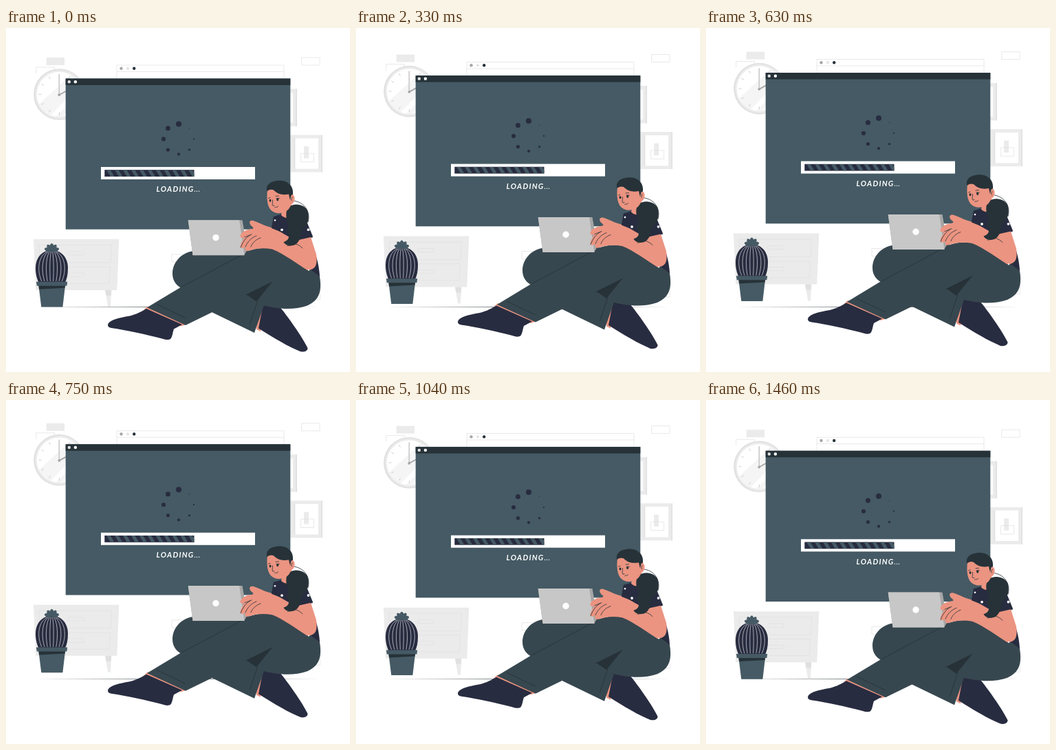
Write an HTML page that moves like this. It is 500 px wide and 500 px high and loops after 1.5 s.

```html
<!DOCTYPE html>
<html lang="en">
<head>
<meta charset="utf-8">
<title>Loading</title>
<style>
  html, body { margin: 0; width: 100%; height: 100%; overflow: hidden; background: #fff; }
  svg { display: block; width: 100vw; height: 100vh; }
  .pale { fill: #ebebeb; }
  .shade { fill: #e0e0e0; }
  .navy { fill: #282c40; }
  .slate { fill: #455a64; }
  .dark { fill: #263238; }
  .pants { fill: #37474f; }
  .skin { fill: #eb9481; }
  .white { fill: #fff; }
  .line { fill: none; stroke: #e0e0e0; stroke-width: .7; }
  .crease { fill: none; stroke: #263238; stroke-width: .8; stroke-linecap: round; }
  text { font: italic 700 11px Lato, sans-serif; letter-spacing: 1.2px; fill: #fff; }
  tspan { font-weight: 400; letter-spacing: .5px; }
</style>
</head>
<body>
<svg viewBox="0 0 500 500">
  <defs>
    <clipPath id="dial"><circle cx="77.5" cy="96.5" r="32.8"/></clipPath>
    <clipPath id="bar"><rect x="143.3" y="206.2" width="130.2" height="9.8"/></clipPath>
  </defs>
  <path class="dark" d="M43 405.4L250 405.1 457 405.4 250 405.8Z"/>

  <g id="scene">
    <g id="wall">
      <rect class="pale" x="58.7" y="43" width="26.3" height="11"/>
      <path class="line" d="M43.7 66V57H70.7V61M429.7 43H456V54H429.7Z"/>
      <circle class="shade" cx="77.5" cy="96.5" r="37.3"/>
      <circle class="pale" cx="78" cy="96.5" r="35.6"/>
      <circle class="white" cx="77.5" cy="96.5" r="32.8"/>
      <g clip-path="url(#dial)" fill="#f5f5f5">
        <path d="M42 116L98 65 112 78 60 132Z"/>
        <path d="M66 135L115 88 119 93 72 138Z"/>
      </g>
      <g id="ticks" stroke="#c7c7c7" stroke-width=".8"></g>
      <path d="M77.3 97V67.5" stroke="#c7c7c7" stroke-width="1.6"/>
      <path d="M77.3 97.3L90 90.3" stroke="#a6a6a6" stroke-width="1.8"/>
      <circle cx="77.3" cy="97.2" r="1.9" fill="#a6a6a6"/>

      <path class="line" d="M161 54H404V120H161ZM161 63.4H404"/>
      <circle cx="167.5" cy="58.7" r="2.2" fill="#a6a6a6"/>
      <circle cx="177" cy="58.7" r="2.2" fill="#e6e6e6"/>
      <circle class="dark" cx="186.2" cy="58.7" r="2.2"/>

      <rect class="pale" x="400" y="88.4" width="23" height="54.4"/>
      <path class="shade" d="M421.3 88.4H423V142.8H421.3Z"/>
      <rect class="white" x="400" y="94" width="17" height="43.5"/>
      <rect class="pale" x="413" y="155.5" width="47" height="54"/>
      <path class="shade" d="M458.5 155.5H460V209.5H458.5ZM418.6 160H420.4V205H418.6Z"/>
      <rect class="white" x="420.4" y="160.3" width="33.6" height="44.4"/>
      <rect class="pale" x="433" y="172" width="7" height="17.5"/>
      <path class="line" d="M428.6 182.3H447.5V194.7H428.6Z"/>
      <path class="line" d="M270 329H241V340H270M440 395H456.4V365"/>
    </g>

    <g id="dresser">
      <path class="pale" d="M40 307H164.3L161.3 381H43.3Z"/>
      <path class="line" d="M48 315.5H153.7L152 341H49.5ZM49.8 347.3H151.7L150 371.3H51ZM90 325H113V330H90ZM90 356H113V361.2H90Z"/>
      <path class="pale" d="M144 381H153.2L152 405H148.2Z"/>
      <path class="shade" d="M144 381H153.2L152.8 389H145.5Z"/>
    </g>

    <g id="cactus">
      <path class="navy" d="M66.5 323C53 323 43 333 43 349C43 358 45 365 48 371H85.5C88.5 365 90 358 90 349C90 333 80 323 66.5 323Z"/>
      <g id="ribs" fill="none" stroke="#fff" stroke-width=".6"></g>
      <g id="petals" class="slate"></g>
      <path class="slate" d="M44 368.7H89.2L88.4 374.7H86L82.4 405.4H51.3L47.5 374.7H44.8Z"/>
      <path class="dark" d="M47.5 374.7H86L85.6 377.8L48 379.8Z"/>
    </g>

    <g id="window">
      <rect class="slate" x="86.7" y="73.5" width="326.6" height="219.2"/>
      <rect class="dark" x="86.7" y="73.5" width="326.6" height="9.5"/>
      <circle class="shade" cx="91.8" cy="78.2" r="2.2"/>
      <circle class="white" cx="100.9" cy="78.2" r="2.2"/>
      <g id="spinner" class="navy"></g>
      <rect class="white" x="138" y="202" width="224" height="18"/>
      <rect class="navy" x="143.3" y="206.2" width="130.2" height="9.8"/>
      <g id="stripes" class="slate" clip-path="url(#bar)"></g>
      <text x="218.6" y="238.4">LOADING<tspan>...</tspan></text>
    </g>

    <g id="legs">
      <path class="skin" d="M365 410L376 400 370 441 364 438Z"/>
      <path class="navy" d="M374 400L397 404C410 420 430 448 438.4 465C439 469 434 471.5 428 470.3C412 464 388 450 367 436.5Z"/>
      <path class="pants" d="M350 320L270 324.5C253 328 242 342 242 357C242 368 248 375 258 380L298 412.5 361 443 387 369Z"/>
      <path class="skin" d="M206 404.5L262 431 254 433.5 200 410Z"/>
      <path class="navy" d="M204 408L256 431 244 437.5C242 443 242 449 239 452C236 454 231 453 225 451C205 446 175 439 153 436C148 435 147 432 149 429C153 424 163 421.5 180 418.5C190 416 197 412 204 408Z"/>
      <path class="pants" d="M205 406.3L262 372 340 329.5C360 318 385 317 405 325L455.5 359C459.5 380 457 395 438 403.5C417 411 391 408 372 402.5L364 397.5 350 388.5 261 432Z"/>
      <path class="dark" d="M349.5 387.5L387 369 364 397.5Z"/>
      <path class="crease" d="M219 401.5L260 421M256 376L346 328M366 396L354.5 430M387 369L349 388"/>
    </g>

    <g id="body">
      <path class="navy" d="M389 274L410 268 438 284 446 303 441 307C450 325 455 343 456 361L441 350 420 325 386 291Z"/>
      <path d="M264.7 279.3H343.5L351 322 346 330.3H271.5Z" fill="#a6a6a6"/>
      <path d="M264.7 279.3H339.2L346.5 330.3H271.5Z" fill="#c7c7c7"/>
      <circle class="white" cx="305" cy="304.7" r="4.7"/>
      <path class="skin" d="M390 291C378 289 369 283 359 280C354 279 352.5 283 356.5 287.5C360 290 361 292 356 292.3C349 293 342 297 340.3 302C341 306 344 306 347 304C343 310 339.5 316 341 319C343 321 346 320 348 318C346 321 348 325 352 324C361 320.5 374 319 387 321.5C404 328 423 343 438 352C450 351 453 345 451 329L443 304 421 309 405 300Z"/>
      <path class="crease" d="M347 304L357 300M348 318C351 311 356 305 364 302M356 318C358 312 364 307 370 305M431 320C428 317 425 315 421 314M341 319C344 311 349 304 355 301"/>
      <path class="navy" d="M389 274L438 284 446 304.5 424 301 406 299 386 291Z"/>
      <path class="skin" d="M402 262L414 250 417 268C414 275 407 279 400 272Z"/>
      <path class="dark" d="M409 262C418 253 434 256 438.5 266C442 278 438 288 430 294C426 301 429 310 420 315C413 318 406 316 403.5 311C411 309 413 303 409 297C407 292 412 289 411 285C407 279 406 269 409 262Z"/>
      <path class="crease" d="M417 251C435 253 443 268 439 282M430 294C431 304 424 316 409 316.5"/>
      <g class="white">
        <circle cx="401" cy="293.3" r="1.9"/>
        <circle cx="439.5" cy="293.2" r="1.9"/>
        <circle cx="391" cy="279.5" r="1.3"/>
        <circle cx="440" cy="351.8" r="1.1"/>
      </g>
    </g>

    <g id="head">
      <path class="skin" d="M380 235C378.5 249 380 259 385 264.5C391 271 404 271 411 263C413 260 414 258 414.5 256.5C420.5 255 421.5 243 416 242L414 233Z"/>
      <path class="dark" d="M379.5 237.5C376.5 228 385 221.7 398 221.7C410 221.7 418.5 230 417 242L414.5 243 413 250C412 246 411.5 244 411 241.5C402 243.5 394 241 389 235.5C385 234 382 235 379.5 237.5Z"/>
      <g class="dark">
        <ellipse cx="384" cy="250.7" rx="1.5" ry="2"/>
        <ellipse cx="394.7" cy="249.3" rx="1.6" ry="2.1"/>
      </g>
      <path class="crease" stroke-width="1" d="M381.5 247.5L384 246.5M392 244.5L396.5 244M387.5 250C388 254 386 257 388 258.5L390 258M390.5 261C392 259 394 262 395.5 259M416 246C415 248 414 250 415.5 251M393 247.5L397.5 247.5"/>
    </g>
  </g>
</svg>

<script>
  const PERIOD = 1500, RISE = 10, PHASE = 30;
  const $ = id => document.getElementById(id);
  const repeat = (id, count, draw) => {
    $(id).innerHTML = Array.from({ length: count }, (_, i) => draw(i)).join('');
  };

  repeat('ticks', 12, i =>
    `<path d="M77.5 66.5v4" transform="rotate(${i * 30} 77.5 96.5)"/>`);

  repeat('ribs', 8, i => {
    const side = i - 3.5, x = 66.5 + side * 5.6;
    return `<path d="M${66.5 + side * 1.8} 325C${x} 331 ${x + side * .7} 352 ${66.5 + side * 4.2} 368"/>`;
  });

  repeat('petals', 5, i =>
    `<ellipse cx="66.5" cy="318.5" rx="2.9" ry="5.5" transform="rotate(${(i - 2) * 36} 66.5 324)"/>`);

  repeat('spinner', 8, i => {
    const a = -(i + 2) * Math.PI / 4;
    return `<circle cx="${251 + 22 * Math.cos(a)}" cy="${161.4 + 22 * Math.sin(a)}" r="${4 - i * .48}"/>`;
  });

  repeat('stripes', 12, i =>
    `<path d="M${146 + i * 11.9} 206h5.5l6 10h-5.5z"/>`);

  // Height above the lowest point: a steady climb and a steady return.
  const lift = ms => {
    const p = ((ms + PHASE) % PERIOD) / PERIOD;
    return RISE * (1 - Math.abs(1 - 2 * p));
  };

  const start = performance.now();
  function frame() {
    const t = performance.now() - start;
    $('scene').setAttribute('transform', `translate(0 ${lift(0) - lift(t)})`);
    requestAnimationFrame(frame);
  }
  frame();
</script>
</body>
</html>
```
